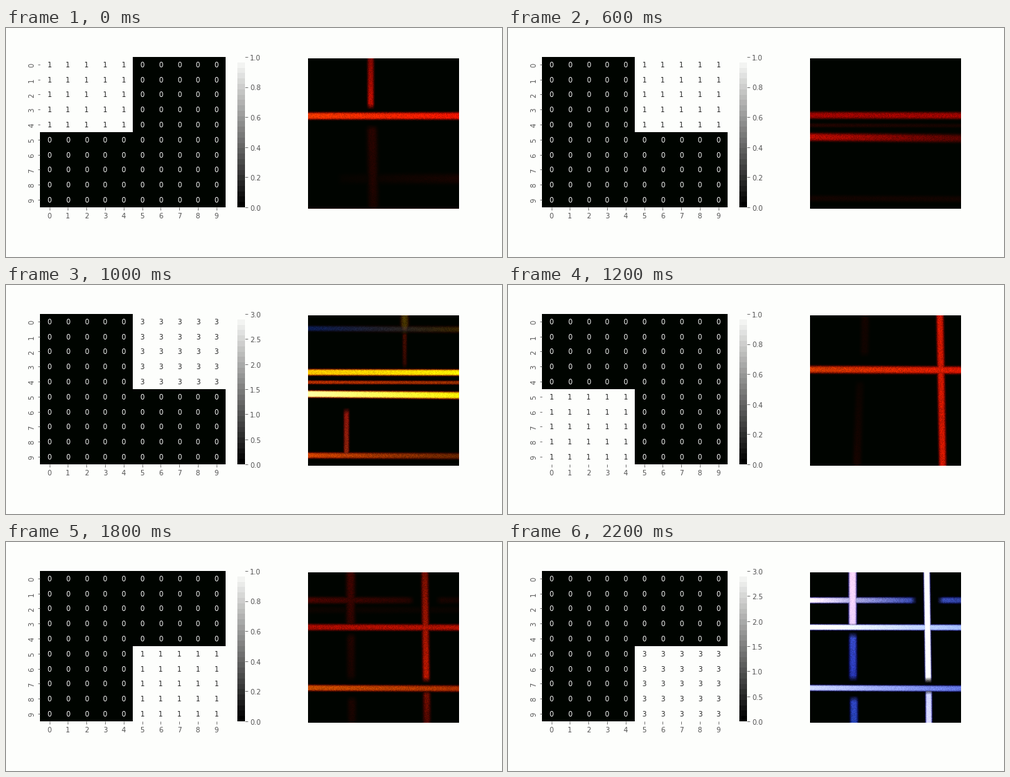
A matplotlib script for the animation above (2400 ms loop, 716 px wide and 332 px high).

```python
import numpy as np
import matplotlib.pyplot as plt
from matplotlib.animation import FuncAnimation
from matplotlib.colors import to_rgb

W, H, DPI = 716, 332, 72
N = 218            # side of the picture, px
PAPER, INK, GREY = "#fdfefc", "#000400", "#555555"
CELLS = 10
LEFT, TOP, WIDTH, HEIGHT = 49.2, 41.9, 268, 218
DROP = 1           # text sits this far below its anchor, px

plt.rcParams.update({
    "font.family": "DejaVu Sans", "font.size": 10,
    "xtick.major.size": 3.5, "ytick.major.size": 3.5,
    "xtick.color": GREY, "ytick.color": GREY,
})

fig = plt.figure(figsize=(W / DPI, H / DPI), dpi=DPI, facecolor=PAPER)


def add_axes(x, y, w, h):
    ax = fig.add_axes([x / W, 1 - (y + h) / H, w / W, h / H])
    ax.set_facecolor("none")
    ax.tick_params(labelbottom=False, labelleft=False, labelright=False)
    for spine in ax.spines.values():
        spine.set_visible(False)
    return ax


def write(x, y, text, ha="center", va="center", color=GREY, **style):
    return fig.text(x / W, 1 - (y + DROP) / H, text, ha=ha, va=va,
                    color=color, **style)


def band(axis, p0, p1, half, low, high, start=0, end=N):
    """A straight band; low and high are (first, last) colours at weak and strong gain."""
    pair = [tuple(to_rgb("#" + c) for c in s.split()) for s in (low, high)]
    return axis, p0, p1, half, pair, start, end


SCENES = [
    [   # top left
        band("h", 83, 83, 4.6, "ff3c00 ff1400", "fffff0 ffffd0"),
        band("v", 90, 90, 4, "8c0800 d21000", "ffd060 fff080", 0, 74),
        band("v", 90, 94, 6, "300000 1c0000", "a03000 902000", 95),
        band("h", 174, 174, 6, "060000 1a0000", "401000 a02800", 40),
        band("h", 217, 217, 2, "120000 120000", "301000 301000"),
    ],
    [   # top right
        band("h", 82, 82.5, 4.3, "aa0000 aa0000", "ffc800 fff000"),
        band("h", 96.5, 97, 2.4, "260000 160000", "be3200 a03200"),
        band("h", 113.5, 115.5, 4.9, "c80c00 5a0000", "ffffa0 fff000"),
        band("h", 202.5, 203.5, 3.8, "140000 140000", "dc4600 6e2800"),
        band("h", 18.5, 20, 4, "000000 000000", "0c1e5a 3c2800"),
        band("v", 139, 139, 5, "000000 000000", "503c00 463200", 0, 28),
        band("v", 139, 139, 2.6, "000000 000000", "501000 320800", 20, 78),
        band("v", 55, 55, 3.4, "000000 000000", "96140c 96280c", 133, 208),
    ],
    [   # bottom left
        band("h", 78, 79, 4.8, "dc3c00 eb1900", "ffffff ffffff"),
        band("v", 187, 191, 4.6, "dc1900 dc1900", "ffffff ffffff"),
        band("v", 79, 76, 5, "160000 120000", "0a1eaa 0a20d2", 0, 61),
        band("v", 75, 67, 5, "0c0000 1a0000", "0a14b4 1e3cff", 92),
    ],
    [   # bottom right
        band("h", 79, 79.5, 4, "b40c00 be1400", "ffffff a0b9ff"),
        band("h", 167, 168, 4, "d25000 b43200", "c8d2ff 6478e6"),
        band("v", 168, 171, 4.4, "821000 c81900", "ffffff ffffff", 0, 160),
        band("v", 170, 171, 4.4, "821000 5a0800", "c8cdff d2d2ff", 168),
        band("v", 61, 61, 5.4, "460000 320000", "f0cdf0 e1c8ff", 0, 82),
        band("v", 61, 62, 5, "240000 180000", "3c50d2 2838be", 86, 158),
        band("v", 62, 63, 5, "200000 180000", "3246c8 2846be", 178),
        band("h", 40, 40, 4, "500000 240000", "ffeeff 3246b4", 0, 154),
        band("h", 40, 40, 4, "1c0000 140000", "3c50be 3246aa", 183),
        band("h", 54, 54, 4, "0e0000 0a0000", "000000 000000"),
    ],
]

MIX = {1: np.zeros(3), 2: np.array([0.6, 0.5, 0.35]), 3: np.ones(3)}
WARM = np.array([1.06, 0.9, 0.85])     # relative width of each channel
COOL = np.array([0.96, 0.96, 1.06])
along, across = np.meshgrid(np.arange(N), np.arange(N))


def ramp(x):
    return np.clip(x, 0, 1)


def paint_band(spec, gain, spread):
    axis, p0, p1, half, (low, high), start, end = spec
    u, v = (along, across) if axis == "h" else (across, along)
    t = ramp((u - start) / (end - start))[..., None]
    m = MIX[gain]
    first, last = (np.array(a) * (1 - m) + np.array(b) * m
                   for a, b in zip(low, high))
    colour = first * (1 - t) + last * t
    # bright bands saturate to a flat top, dim ones stay soft
    power = 2.5 + 4 * colour.mean(axis=2, keepdims=True)
    off = np.abs(v - p0 - (p1 - p0) * u / N)[..., None] / (half * spread)
    shape = np.exp(-0.7 * off ** power)
    if start > 0:
        shape = shape * ramp((u - start) / 9)[..., None]
    if end < N:
        shape = shape * ramp((end - u) / 9)[..., None]
    return colour * shape


def picture(quad, gain):
    rng = np.random.default_rng(10 * quad + gain)
    spread = COOL if quad > 1 and gain == 3 else WARM
    img = np.zeros((N, N, 3))
    for spec in SCENES[quad]:
        img = np.maximum(img, paint_band(spec, gain, spread))
    grain = rng.random((N, N))
    light = img.mean(axis=2)
    img *= (1.1 - 0.42 * grain * ramp(1.1 - light))[..., None]
    return np.clip(np.maximum(img, to_rgb(INK)), 0, 1)


PICTURES = [picture(q, g) for q in range(4) for g in (1, 2, 3)]

# heat map
heat = add_axes(LEFT, TOP, WIDTH, HEIGHT)
heat.set_xlim(0, CELLS)
heat.set_ylim(CELLS, 0)
centres = np.arange(CELLS) + 0.5
heat.set_xticks(centres)
heat.set_yticks(centres)
heat.add_patch(plt.Rectangle((0, 0), CELLS, CELLS, fc=INK, lw=0))
patch = heat.add_patch(plt.Rectangle((0, 0), 5, 5, fc=PAPER, lw=0))

cols = LEFT + centres * WIDTH / CELLS
rows = TOP + centres * HEIGHT / CELLS
labels = [[write(x, y, "0") for x in cols] for y in rows]
for i in range(CELLS):
    write(cols[i], TOP + HEIGHT + 7, str(i), va="top")
    write(LEFT - 7, rows[i], str(i), ha="right", rotation="vertical")

# colour bar
bar = add_axes(334, TOP, 11, HEIGHT)
shades = np.linspace(0, 1, 28)[:, None, None] * np.array(to_rgb(PAPER))
bar.imshow(shades, origin="lower", aspect="auto", extent=(0, 1, 0, 1),
           interpolation="nearest")
bar.set_xticks([])
bar.yaxis.set_ticks_position("right")
bar.tick_params(labelright=False)


def scale(gain, step, fmt):
    values = np.arange(0, gain + step / 2, step)
    places = values / gain
    texts = [write(352, TOP + HEIGHT * (1 - p), fmt.format(v),
                   ha="left", va="center_baseline")
             for p, v in zip(places, values)]
    return places, texts


SCALES = {1: scale(1, 0.2, "{:.1f}"), 2: scale(2, 0.25, "{:.2f}"),
          3: scale(3, 0.5, "{:.1f}")}

# picture
view = add_axes(436, 44, N, N)
view.axis("off")
photo = view.imshow(PICTURES[0], aspect="auto", interpolation="nearest")


def update(i):
    quad, gain = i // 3, i % 3 + 1
    row, col = divmod(quad, 2)
    patch.set_xy((5 * col, 5 * row))
    for r, line in enumerate(labels):
        for c, label in enumerate(line):
            lit = r // 5 == row and c // 5 == col
            label.set_text(str(gain) if lit else "0")
            label.set_color("#262626" if lit else "white")
    for g, (places, texts) in SCALES.items():
        for text in texts:
            text.set_visible(g == gain)
    bar.set_yticks(SCALES[gain][0])
    bar.set_ylim(0, 1)
    photo.set_data(PICTURES[i])
    return []


anim = FuncAnimation(fig, update, frames=12, interval=200, repeat=True,
                     repeat_delay=0, init_func=lambda: update(0), blit=False)
plt.show()
```
